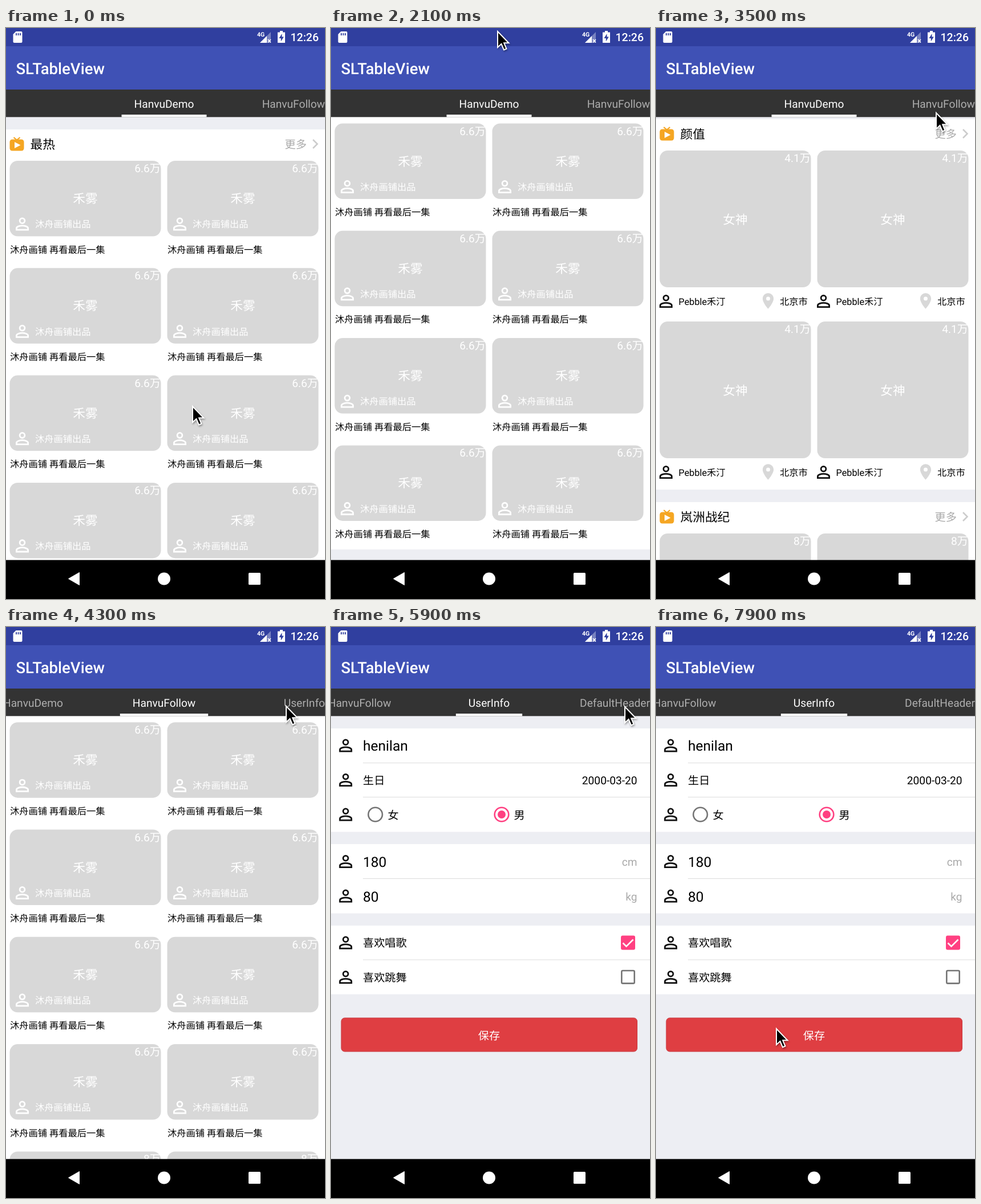
Animation of 559 by 1002 pixels, one loop 8000 ms. Source, as an HTML page:

```html
<!DOCTYPE html>
<html lang="zh-CN">
<head>
<meta charset="utf-8">
<title>SLTableView</title>
<style>
  html, body { margin: 0; width: 100%; height: 100%; overflow: hidden; background: #000; }
  svg { display: block; width: 559px; height: 1002px; }
  text { font-family: Roboto, "Noto Sans CJK SC", "Noto Sans CJK", sans-serif; white-space: pre;
    text-rendering: geometricPrecision; }
</style>
</head>
<body>
<svg id="stage" viewBox="0 0 559 1002" xmlns="http://www.w3.org/2000/svg"></svg>
<script>
const LOOP = 8000, STEP = 100;
const PAGE_W = 564, MID = 277, LEFT = -5, RIGHT = 559;
const GREY = '#d8d8d8', BACK = '#edeef3', PINK = '#ff4081', HINT = '#aaa';
const SMALL = 16.25, BODY = 19.15, LARGE = 21.7, INPUT = 24.5;
const TABS = ['HanvuDemo', 'HanvuFollow', 'UserInfo', 'DefaultHeader'];

// Drawing helpers
const text = (x, y, size, fill, str, anchor = 'start', extra = '') =>
  `<text x="${x}" y="${y}" font-size="${size}" fill="${fill}" text-anchor="${anchor}" ${extra}>${str}</text>`;
const rect = (x, y, w, h, fill, r = 0, extra = '') =>
  `<rect x="${x}" y="${y}" width="${w}" height="${h}" fill="${fill}" rx="${r}" ${extra}/>`;
const group = (x, y, body) => `<g transform="translate(${x} ${y})">${body}</g>`;
const range = n => [...Array(n).keys()];

const person = (x, y, color) => `<g transform="translate(${x} ${y}) scale(1.44) translate(-12 -12)"
  fill="none" stroke="${color}" stroke-width="1.95"><circle cx="12" cy="8" r="3.05"/>
  <path d="M5 19v-2c0-2 4.4-3.05 7-3.05s7 1.05 7 3.05v2z"/></g>`;

const pin = (x, y) => `<path transform="translate(${x} ${y}) scale(1.37) translate(-12 -12)" fill="${GREY}"
  d="M12 2C8.1 2 5 5.1 5 9c0 5.3 7 13 7 13s7-7.7 7-13c0-3.9-3.1-7-7-7zm0 9.5a2.5 2.5 0 1 1 0-5 2.5 2.5 0 0 1 0 5z"/>`;

const television = `<g transform="translate(6.5 35)"><path d="M7 1l5.5 4.5L18 1" fill="none" stroke="#f5a623" stroke-width="2.2"/>
  ${rect(0, 4.5, 25, 20, '#f5a623', 4.5)}<path d="M8.5 9l10.5 5.5-10.5 5.5z" fill="#fff"/></g>`;

// List building blocks
const wideCard = count =>
  rect(6.5, 0, 265, 132.5, GREY, 14) +
  text(271, 20, BODY, '#fff', count, 'end') +
  text(139, 74, LARGE, '#fff', '禾雾', 'middle') +
  person(28.5, 111, '#fff') +
  text(51, 117.3, SMALL, '#fff', '沐舟画铺出品') +
  text(7, 161.5, SMALL, '#000', '沐舟画铺 再看最后一集');

const tallCard = () =>
  rect(6.5, 0, 265, 240, GREY, 14) +
  text(271, 20, BODY, '#fff', '4.1万', 'end') +
  text(139, 128.5, LARGE, '#fff', '女神', 'middle') +
  person(17.5, 264.5, '#111') +
  text(39.5, 270.7, SMALL, '#000', 'Pebble禾汀') +
  pin(196.5, 264) +
  text(217, 270.7, SMALL, '#000', '北京市');

const rows = (n, pitch, card) =>
  range(n).map(i => group(0, i * pitch, card) + group(276, i * pitch, card)).join('');

const section = (y, height, title, body) => group(0, y,
  rect(LEFT, 22, PAGE_W, height - 22, '#fff') + television +
  text(42.5, 56, LARGE, '#000', title) +
  text(488.5, 54.5, BODY, HINT, '更多') +
  `<path d="M538 40l7.5 7.5-7.5 7.5" fill="none" stroke="#ccc" stroke-width="2.6"/>` +
  group(0, 77, body));

const demoPage = `<g id="list">` +
  section(0, 824.5, '最热', rows(4, 188.3, wideCard('6.6万'))) +
  section(824.5, 672, '颜值', rows(2, 300, tallCard())) +
  section(1496.5, 824.5, '岚洲战纪', rows(4, 188.3, wideCard('8万'))) + `</g>`;

const followPage = rect(LEFT, 0, PAGE_W, 780, '#fff') +
  group(0, 11.2, rows(4, 188.3, wideCard('6.6万')) + group(0, 753.2, rows(1, 0, wideCard('8万'))));

// Form page, in stage coordinates
const panel = (y, h, ...lines) => rect(LEFT, y, PAGE_W, h, '#fff') +
  lines.map(l => rect(56, l, 503, 1, '#dcdcdc')).join('');
const radio = (x, color, dot) =>
  `<circle cx="${x}" cy="329" r="12.3" fill="none" stroke="${color}" stroke-width="2.6"/>` +
  (dot ? `<circle cx="${x}" cy="329" r="7" fill="${color}"/>` : '');

const formPage = group(0, -156,
  panel(178, 181.5, 238, 298) + panel(381, 121.5, 441) + panel(524, 120.5, 583.5) +
  [208, 268.5, 329, 411.5, 472, 554, 614.5].map(y => person(25.7, y, '#111')).join('') +
  text(56, 217, INPUT, '#000', 'henilan') +
  text(56, 276, BODY, '#000', '生日') +
  text(536.5, 276, BODY, '#000', '2000-03-20', 'end') +
  radio(77.7, '#757575') + text(99.5, 336.5, BODY, '#000', '女') +
  radio(299, PINK, true) + text(320.5, 336.5, BODY, '#000', '男') +
  text(56, 420.5, INPUT, '#000', '180') + text(536.5, 418.5, BODY, HINT, 'cm', 'end') +
  text(56, 481.5, INPUT, '#000', '80') + text(536.5, 479.5, BODY, HINT, 'kg', 'end') +
  text(56, 561, BODY, '#000', '喜欢唱歌') + text(56, 621.5, BODY, '#000', '喜欢跳舞') +
  rect(508, 541.5, 25, 25, PINK, 3) +
  `<path d="M511.5 554.5l6 6 12-12" fill="none" stroke="#fff" stroke-width="2.6"/>` +
  rect(509.3, 603, 22.4, 22.4, 'none', 2, 'stroke="#757575" stroke-width="2.6"') +
  rect(18, 686, 518.5, 59, '#df3e42', 6, 'stroke="#c93a40"') +
  text(MID, 723.5, BODY, '#fff', '保存', 'middle'));

const statusBar = rect(0, 0, 559, 32, '#303f9f') +
  `<path d="M17.5 6H26.5a2 2 0 0 1 2 2V24a2 2 0 0 1-2 2H14.5a2 2 0 0 1-2-2V11z" fill="#fff"/>
   <path d="M18 9v4M21.5 9v4M25 9v4" stroke="#303f9f" stroke-width="1.8"/>
   <path d="M464 7V26H445z" fill="#fff" opacity=".35"/>
   <path d="M457 14v12H445z" fill="#fff"/>
   <path d="M459 20l5 5.5m0-5.5l-5 5.5" stroke="#fff" stroke-width="1.7"/>
   <path d="M480 5h5v2.5h4V26H476V7.5h4z" fill="#fff"/>
   <path d="M483.5 10l-5 8h3.3v5.5l5-8h-3.3z" fill="#303f9f"/>` +
  text(440, 15, 10.5, '#fff', '4G', 'start', 'font-weight="700"') +
  text(548, 23.3, 19.5, '#fff', '12:26', 'end', 'font-weight="500"');

const navBar = rect(0, 933.6, 559, 69, '#000') +
  `<path d="M109.5 966.5L128.5 955.5V977.5z" fill="#fff" stroke="#fff" stroke-linejoin="round"/>
   <circle cx="277" cy="966.5" r="11" fill="#fff"/>` + rect(425, 956, 21, 21, '#fff', 1.5);

const cursor = `<g id="cursor" style="filter:drop-shadow(1px 2px 1.5px rgba(0,0,0,.35))">
  <path d="M1 1V29L7.5 23L12 33.5L16.5 31.5L12.2 21.3H20.5z"
    fill="#000" stroke="#fff" stroke-width="2"/></g>`;

const stage = document.getElementById('stage');
stage.innerHTML = rect(0, 0, 559, 1002, BACK) +
  [demoPage, followPage, formPage].map(p => `<g class="page">${p}</g>`).join('') +
  rect(0, 108, 559, 48.3, '#333') +
  TABS.map(t => text(0, 139.7, BODY, '#fff', t, 'start', 'class="tab"')).join('') +
  rect(0, 152, 0, 4.3, '#fff', 0, 'id="marker"') +
  rect(0, 32, 559, 76, '#3f51b5') +
  text(17.5, 81, 27.5, '#fff', 'SLTableView', 'start', 'font-weight="500"') +
  statusBar + navBar + cursor;

const pick = id => document.getElementById(id);
const list = pick('list'), marker = pick('marker'), pointer = pick('cursor');
const pages = [...stage.querySelectorAll('.page')];
const tabs = [...stage.querySelectorAll('.tab')];

// Motion: [time, ...values]
const SCROLL = [[0, 0], [300, 0], [500, 380], [700, 740], [900, 842], [1200, 842], [1400, 480],
  [1600, 80], [1700, 0], [1900, 0], [2000, 8], [2100, 65.5], [2200, 300], [2300, 545], [2400, 725],
  [2500, 823.5], [2700, 842.5]];
const POINTER = [[0, 326, 663], [100, 326, 663], [500, 300, 1], [700, 300, 1], [900, 305, 160],
  [1100, 305, 160], [1500, 310, 640], [1800, 310, 640], [2100, 291, 5], [2700, 291, 5],
  [3400, 490, 148], [3600, 490, 148], [3700, 490, 138], [4400, 490, 138], [5000, 516, 148],
  [5500, 516, 148], [5800, 514, 139], [6700, 514, 139], [7500, 210, 704]];
const SWIPES = [[3800, 500], [5400, 450]];

function track(keys, t) {
  const i = keys.findIndex(k => k[0] > t);
  if (i < 0) return keys[keys.length - 1].slice(1);
  const [a, b] = [keys[i - 1], keys[i]];
  const u = (t - a[0]) / (b[0] - a[0]);
  return a.slice(1).map((v, j) => v + (b[j + 1] - v) * u);
}

const easeOut = u => 1 - (1 - Math.min(1, Math.max(0, u))) ** 5;
const move = (el, x, y) => el.setAttribute('transform', `translate(${x} ${y})`);

// The current title slides between the edges; its neighbours stay pinned to them.
function layoutTabs(pos) {
  const current = Math.round(pos), offset = pos - current, gap = 22;
  const widths = tabs.map(t => t.getComputedTextLength());
  const w = widths[current];
  const left = MID - w / 2 - offset * (PAGE_W - w);
  tabs.forEach((tab, i) => {
    let x = left;
    if (i < current) x = Math.min(LEFT, left - gap - widths[i]);
    if (i > current) x = Math.max(RIGHT - widths[i], left + w + gap);
    tab.setAttribute('x', x);
    tab.setAttribute('opacity', i === current ? 1 : 0.6);
    tab.setAttribute('visibility', Math.abs(i - current) > 1 ? 'hidden' : 'visible');
  });
  marker.setAttribute('x', left - gap);
  marker.setAttribute('width', w + 2 * gap);
  marker.setAttribute('opacity', 1 - 2 * Math.abs(offset));
}

function render(time) {
  const t = Math.floor((time % LOOP) / STEP) * STEP;
  const pos = SWIPES.reduce((sum, [start, length]) => sum + easeOut((t - start) / length), 0);
  pages.forEach((page, i) => move(page, (i - pos) * PAGE_W, 156));
  move(list, 0, -track(SCROLL, t)[0]);
  move(pointer, ...track(POINTER, t));
  layoutTabs(pos);
}

const start = performance.now();
(function tick() {
  render(performance.now() - start);
  requestAnimationFrame(tick);
})();
</script>
</body>
</html>
```
